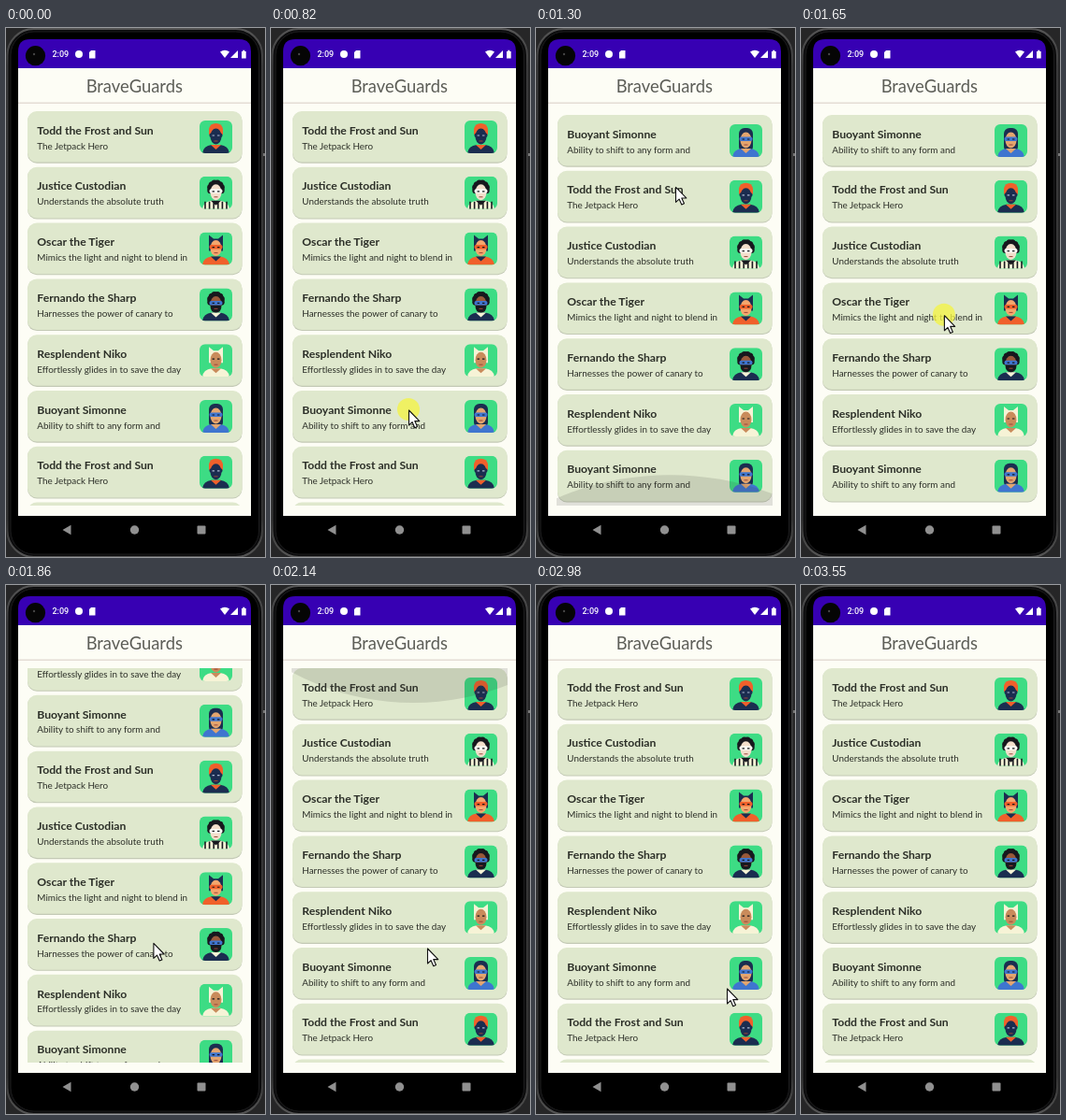
An HTML page that plays this animation: 277 px wide and 566 px high, repeating every 3820 ms.

```html
<!DOCTYPE html>
<html lang="en">
<head>
<meta charset="utf-8">
<title>Hero list</title>
<style>
  html, body { margin: 0; width: 100%; height: 100%; overflow: hidden; background: #262627; }
  svg { display: block; width: 277px; height: 566px; }
  text { font-family: Lato, "Open Sans", sans-serif; }
  .title { font-size: 18.4px; fill: #5c5d57; text-anchor: middle; }
  .name { font-size: 12.2px; font-weight: 700; fill: #2b2e27; }
  .info { font-size: 9.9px; fill: #2b2e27; }
  .clock { font: 500 9px Roboto, sans-serif; fill: #fff; }
</style>
</head>
<body>
<svg viewBox="0 0 277 566" xmlns="http://www.w3.org/2000/svg">
  <defs>
    <clipPath id="view"><rect x="22" y="89" width="231" height="422"/></clipPath>
    <clipPath id="tile"><rect width="35" height="35" rx="6"/></clipPath>
    <linearGradient id="rim" x2="0" y2="1">
      <stop stop-color="#555"/><stop offset=".07" stop-color="#3a3a3b"/>
      <stop offset=".93" stop-color="#333"/><stop offset="1" stop-color="#555"/>
    </linearGradient>
  </defs>

  <!-- phone body -->
  <rect x="275" y="134" width="2" height="3" fill="#777"/>
  <rect x="1.500" y="1" width="272.500" height="565" rx="28" fill="#0c0c0d" stroke="url(#rim)" stroke-width="2"/>
  <rect x="5" y="4" width="265.500" height="559" rx="25" stroke="#1c1c1d"/>

  <!-- screen -->
  <path d="M13 43V25q0-13 13-13h223q13 0 13 13v18z" fill="#3700b3"/>
  <rect x="13" y="43" width="249" height="479" fill="#fdfdf5"/>
  <rect x="13" y="79.500" width="249" height="1.500" fill="#e4ddd5"/>

  <!-- status bar -->
  <circle cx="31.500" cy="29.700" r="10.600" fill="#050505"/>
  <circle cx="30" cy="28" r="1.200" fill="#444"/>
  <text class="clock" x="49.500" y="31.300">2:09</text>
  <g fill="#fff">
    <circle cx="78" cy="28" r="4"/>
    <path d="M91 24h4.500v8.500h-6.500V26z"/>
    <path d="M229 25.500q5-3.500 10 0l-5 6.500z"/>
    <path d="M248 24v8h-8z"/>
    <path d="M252 25h1.300v-1.200h2V25h1.400v7.500H252z"/>
  </g>
  <text class="title" x="137.300" y="69.400">BraveGuards</text>

  <!-- navigation bar -->
  <g fill="#909090">
    <path d="M60.500 537l9-5.300v10.600z"/>
    <circle cx="137.500" cy="537" r="4.700"/>
    <rect x="204.500" y="532.500" width="9" height="9" rx="1"/>
  </g>

  <g clip-path="url(#view)">
    <g id="list"></g>
    <ellipse id="glow" rx="275" fill="#3c4038" fill-opacity=".15"/>
  </g>

  <g id="pointer">
    <circle id="press" r="12" fill="#f4f445" fill-opacity=".78"/>
    <path d="M.5 1v16l3.600-3.300 2.700 6 2.700-1.200-2.700-5.900h5z"
          fill="#fff" stroke="#111" stroke-width="1.100" stroke-linejoin="round"/>
  </g>
</svg>
<script>
const LOOP = 3820, TOP = 89, BOTTOM = 511, PITCH = 59.8, REACH = 295;
const NAVY = "#1b2d50", INK = "#17181e", ORANGE = "#f0602b", BLUE = "#3f75cf", CREAM = "#f6f3d6";

const heroes = [
  { name: "Todd the Frost and Sun", info: "The Jetpack Hero",
    cut: "cap", hair: ORANGE, skin: NAVY, mask: NAVY, suit: NAVY, trim: ORANGE },
  { name: "Justice Custodian", info: "Understands the absolute truth",
    cut: "curls", hair: INK, skin: "#f3dfcc", mask: "#fbfaf4", suit: CREAM, trim: INK, stripes: 6 },
  { name: "Oscar the Tiger", info: "Mimics the light and night to blend in",
    cut: "ears", hair: NAVY, skin: "#f5a66d", mask: ORANGE, suit: ORANGE, trim: NAVY },
  { name: "Fernando the Sharp", info: "Harnesses the power of canary to",
    cut: "curls", hair: INK, skin: "#98593b", mask: BLUE, suit: NAVY, trim: CREAM, beard: INK },
  { name: "Resplendent Niko", info: "Effortlessly glides in to save the day",
    cut: "ears", hair: CREAM, skin: "#c98b5b", mask: "none", suit: CREAM, trim: "#c98b5b" },
  { name: "Buoyant Simonne", info: "Ability to shift to any form and",
    cut: "long", hair: NAVY, skin: "#e3a56e", mask: BLUE, suit: BLUE, trim: "#e3a56e" }
];

const $ = id => document.getElementById(id);
const list = $("list"), glow = $("glow"), pointer = $("pointer"), press = $("press");
const repeat = (n, make) => Array.from({ length: n }, (_, i) => make(i)).join("");

const cuts = {
  cap: () => `<path d="M10 15V9q1-6 7.500-6T25 9v6z"/>`,
  ears: () => `<path d="M10 20V3l5 4h5l5-4v17z"/>`,
  long: () => `<rect x="10" y="4" width="15" height="26" rx="6"/>`,
  curls: () => repeat(8, i => {
    const a = Math.PI * (1.1 - i * 1.2 / 7);
    return `<circle cx="${17.5 + 6 * Math.cos(a)}" cy="${13 - 6 * Math.sin(a)}" r="3.5"/>`;
  })
};

function avatar(h) {
  return `<rect width="35" height="35" fill="#3ddc84"/>
    <g fill="${h.hair}">${cuts[h.cut]()}</g>
    <path d="M3 35q1-8 10-9h9q9 1 10 9z" fill="${h.suit}"/>
    ${repeat(h.stripes || 0, i => `<path d="M${6 + i * 4.6} 27v8" stroke="${h.trim}" stroke-width="1.6"/>`)}
    <path d="M12 26h11l-5.500 5z" fill="${h.trim}"/>
    <ellipse cx="17.500" cy="17" rx="6" ry="8.500" fill="${h.skin}"/>
    ${h.beard ? `<path d="M11.500 18h12q0 8-6 8t-6-8" fill="${h.beard}"/>` : ""}
    <rect x="10.500" y="13.500" width="14" height="4.500" rx="2" fill="${h.mask}"/>
    <path d="M13.500 16h2.500m3 0h2.500" stroke="${h.skin === NAVY ? "#a9b6d0" : INK}" stroke-width="1.200"/>
    <path d="M15.500 22h4" stroke="#9c4538"/>`;
}

list.innerHTML = repeat(2 * heroes.length, i => {
  const h = heroes[i % heroes.length];
  return `<g transform="translate(23 ${TOP + i * PITCH})">
    <rect y=".8" width="229.500" height="54.900" rx="10" fill="#c3c9b5"/>
    <rect width="229.500" height="54.600" rx="10" fill="#dfe8cd"/>
    <text class="name" x="10.300" y="24.700">${h.name}</text>
    <text class="info" x="10.300" y="40.500">${h.info}</text>
    <g transform="translate(184 10)" clip-path="url(#tile)">${avatar(h)}</g></g>`;
});

const ramp = (t, a, b) => Math.min(1, Math.max(0, (t - a) / (b - a)));
const smooth = p => p * p * (3 - 2 * p);
const easeOut = p => 1 - (1 - p) ** 1.6;

// Pointer stops: arrival time, place and how it gets there
const stops = [
  { t: 200, x: 243, y: 511 },
  { t: 680, x: 147, y: 408, ease: easeOut },
  { t: 880, x: 147, y: 408 },
  { t: 1230, x: 149, y: 169, ease: smooth },
  { t: 1440, x: 149, y: 170 },
  { t: 1790, x: 155, y: 381, ease: smooth },
  { t: 2140, x: 167, y: 388 },
  { t: 2380, x: 168, y: 385 },
  { t: 2910, x: 197, y: 386, loop: true },
  { t: 2980, x: 204, y: 431 },
  { t: 3470, x: 259, y: 562 }
];

function place(t) {
  const n = stops.findIndex(s => s.t > t);
  if (n <= 0) return stops[n ? stops.length - 1 : 0];
  const a = stops[n - 1], b = stops[n], p = ramp(t, a.t, b.t);
  const q = b.ease ? b.ease(p) : p;
  let x = a.x + (b.x - a.x) * q, y = a.y + (b.y - a.y) * q;
  if (b.loop) {
    const up = Math.sin(Math.PI * p);
    x -= 58 * Math.sin(2 * Math.PI * p) + 42 * up;
    y -= 324 * up;
  }
  return { x, y };
}

function snap(t) {
  const [start, step] = t < 1300 ? [200, 68.7] : [1300, 70];
  return start + Math.floor((t - start) / step) * step;
}

const show = (el, on) => { el.style.display = on ? "" : "none"; };
const pulse = (t, a, peak, b) => ramp(t, a, peak) * (1 - ramp(t, peak, b));

function draw(time) {
  const t = snap(time), { x, y } = place(t);
  pointer.setAttribute("transform", `translate(${x} ${y})`);
  show(pointer, time >= 200 && time < 3550);
  show(press, (t > 745 && t < 1290) || (t >= 1440 && t < 1860));

  const shift = REACH * (smooth(ramp(t, 880, 1290)) - ramp(t, 1790, 2090) ** 1.7);
  list.setAttribute("transform", `translate(0 ${-shift})`);

  const upper = pulse(t, 2000, 2140, 2350), lower = .89 * pulse(t, 1160, 1299, 1650);
  const size = upper || lower;
  glow.setAttribute("ry", 275 * size);
  glow.setAttribute("cx", 137.5 + (x - 137.5) / 2);
  glow.setAttribute("cy", upper ? TOP - 238 * size : BOTTOM + 238 * size);
  show(glow, size > 0);
}

const begin = performance.now();
function tick() {
  draw((performance.now() - begin) % LOOP);
  requestAnimationFrame(tick);
}
tick();
</script>
</body>
</html>
```
